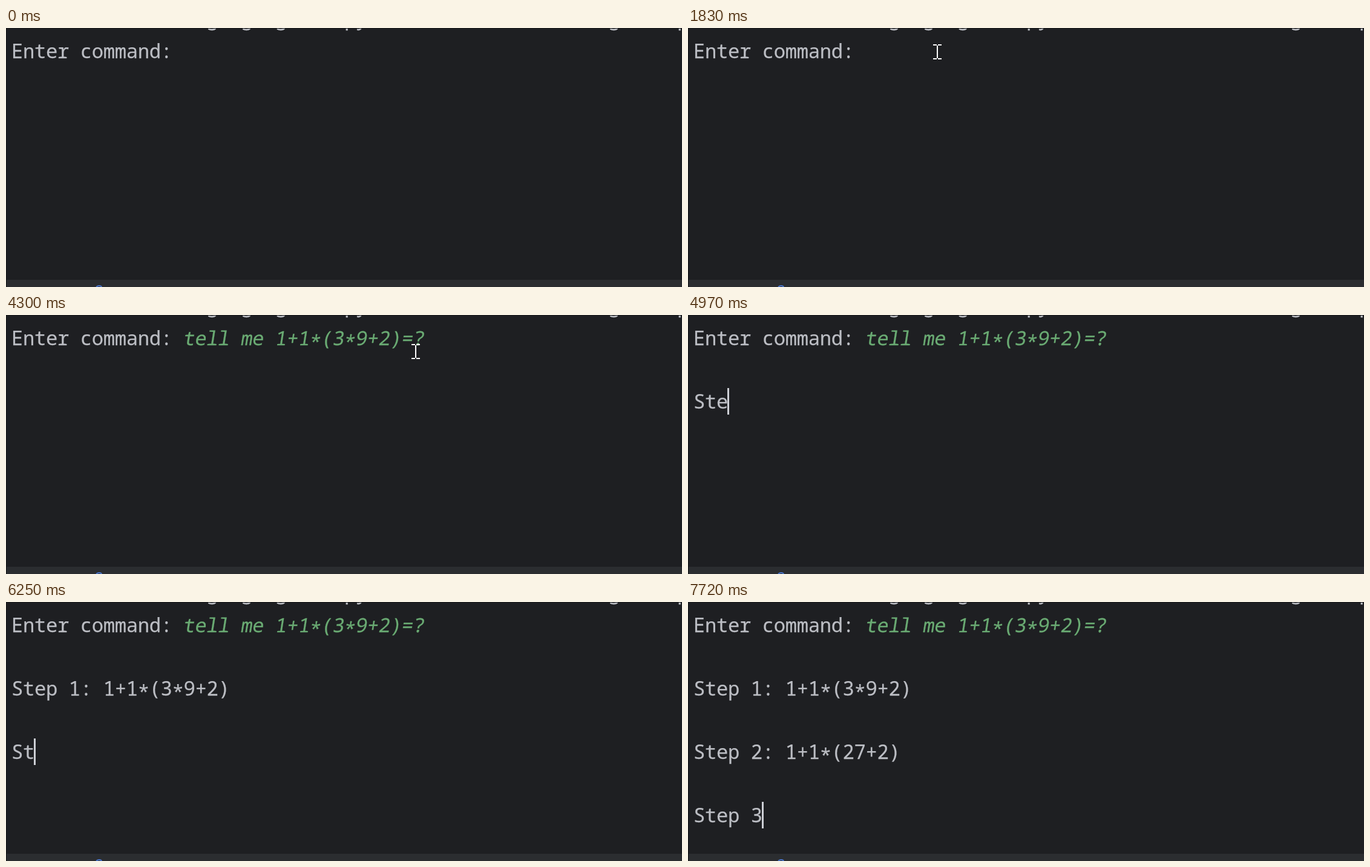
Animation of 1117x429 px, one loop 7990 ms. Source, as an HTML page:

```html
<!DOCTYPE html>
<html lang="en">
<head>
<meta charset="utf-8">
<title>Terminal session</title>
<style>
  html, body { margin: 0; width: 100%; height: 100%; overflow: hidden; background: #1e1f22; }
  svg { display: block; width: 1117px; height: 429px; }
  text {
    font: 32.2px "Noto Sans Mono", "DejaVu Sans Mono", monospace;
    fill: #bcbec4; stroke: #bcbec4; stroke-width: .25px; white-space: pre;
  }
  .input { fill: #6aab73; stroke: #6aab73; }
</style>
</head>
<body>
<svg id="stage" viewBox="0 0 1117 429">
  <rect width="1117" height="429" fill="#1e1f22"/>
  <g id="lines"></g>
  <rect y="417" width="1117" height="12" fill="#2b2d30"/>
  <path d="M149 430q1-3 5-3t4 3" fill="none" stroke="#4a78d0" stroke-width="2"/>
  <path d="M.5 429V.5H1117" fill="none" stroke="#17181a"/>
  <rect id="caret" width="3" fill="#ced0d6"/>
  <path id="mouse" d="M0 1H6M8 1H14M7 2V23M0 24H6M8 24H14" fill="none" stroke="#fff" stroke-width="2"/>
</svg>
<script>
const LOOP = 7990, LEFT = 9, CELL = 18.97, PITCH = 52.5, BASE = 50;
const PROMPT = 'Enter command: ', INPUT = 'tell me 1+1*(3*9+2)=?';
const REPLY = '\nStep 1: 1+1*(3*9+2)\n\nStep 2: 1+1*(27+2)\n\nStep 3';
const CHUNK = 4, CHUNK_MS = 250, BLINK_MS = 530, FRAME_MS = 70;

// moments of the session
const ENTRY = 330, FOCUS = 820, SETTLE = 890, CLICK = 1300, PASTE = 2290;
const ENTER = 3630, ECHO = 3770, LEAVE = 4630, ANSWER = 4970;

const $ = id => document.getElementById(id);
const caret = $('caret'), mouse = $('mouse');
const show = (el, on) => el.setAttribute('visibility', on ? 'visible' : 'hidden');
const mix = (a, b, k) => a + (b - a) * k;
const easeOut = p => 1 - (1 - p) ** 2;
const easeInOut = p => p * p * (3 - 2 * p);

// progress from a to b, held for each screen frame
function progress(t, a, b) {
  const held = Math.floor((t - a) / FRAME_MS) * FRAME_MS;
  return Math.min(1, Math.max(0, held / (b - a)));
}

function setText(el, str) {
  if (el.textContent === str) return;
  const chars = [...str];
  // asterisks sit at mid height
  const drop = c => c === '*' ? 6 : 0;
  el.setAttribute('x', chars.map((c, i) => (i * CELL).toFixed(2)).join(' '));
  el.setAttribute('dy', chars.map((c, i) => drop(c) - drop(chars[i - 1])).join(' '));
  el.textContent = str;
}

function addLine(x, y, str = '', slant = 0) {
  const el = document.createElementNS('http://www.w3.org/2000/svg', 'text');
  el.setAttribute('transform', `translate(${x} ${y}) skewX(${-slant})`);
  $('lines').append(el);
  setText(el, str);
  return el;
}

// only the descenders of the line above reach into view
addLine(LEFT, -4.5, ' '.repeat(17) + 'g  g  g     py' + ' '.repeat(21) + 'g     p');
addLine(LEFT, BASE, PROMPT);
const input = addLine(LEFT + PROMPT.length * CELL - 1.5, BASE, '', 9);
input.classList.add('input');
const rows = Array.from({ length: 6 }, (_, i) => addLine(LEFT, BASE + (i + 1) * PITCH));

// sweeps in with a slight overshoot, drifts down, then moves beside the input
function pointerAt(t) {
  if (t < SETTLE) {
    const p = progress(t, ENTRY, SETTLE), q = 1 - p;
    return [404 + 340 * q ** 3, 20 + 226 * q * q - 80 * p * q];
  }
  if (t < PASTE) {
    const p = progress(t, 1020, 1830);
    return [mix(404, 405, p), mix(20, 27, easeOut(p))];
  }
  const p = easeInOut(progress(t, 2420, 2840));
  return [mix(405, 670, p), mix(27, 48, p)];
}

function caretOn(t, chunks) {
  const resets = [FOCUS, CLICK, PASTE, ECHO];
  if (chunks) resets.push(ANSWER + (chunks - 1) * CHUNK_MS);
  const last = resets.findLast(r => r <= t);
  return last !== undefined && (t - last) % (2 * BLINK_MS) < BLINK_MS;
}

function draw(t) {
  const chunks = Math.max(0, Math.floor((t - ANSWER) / CHUNK_MS) + 1);
  const reply = REPLY.slice(0, chunks * CHUNK).split('\n');
  setText(input, t >= PASTE ? INPUT : '');
  rows.forEach((row, i) => setText(row, reply[i] || ''));

  const line = t < ENTER ? 0 : reply.length;
  const col = line ? reply.at(-1).length : PROMPT.length + input.textContent.length;
  const top = Math.round(16 + line * PITCH);
  caret.setAttribute('x', Math.floor(LEFT + col * CELL));
  caret.setAttribute('y', top);
  caret.setAttribute('height', Math.floor(60 + line * PITCH) - top);
  show(caret, caretOn(t, chunks));

  const [x, y] = pointerAt(t).map(Math.round);
  mouse.setAttribute('transform', `translate(${x} ${y})`);
  show(mouse, t >= ENTRY && t < LEAVE);
}

const start = performance.now();
function tick() {
  draw((performance.now() - start) % LOOP);
  requestAnimationFrame(tick);
}
tick();
</script>
</body>
</html>
```
